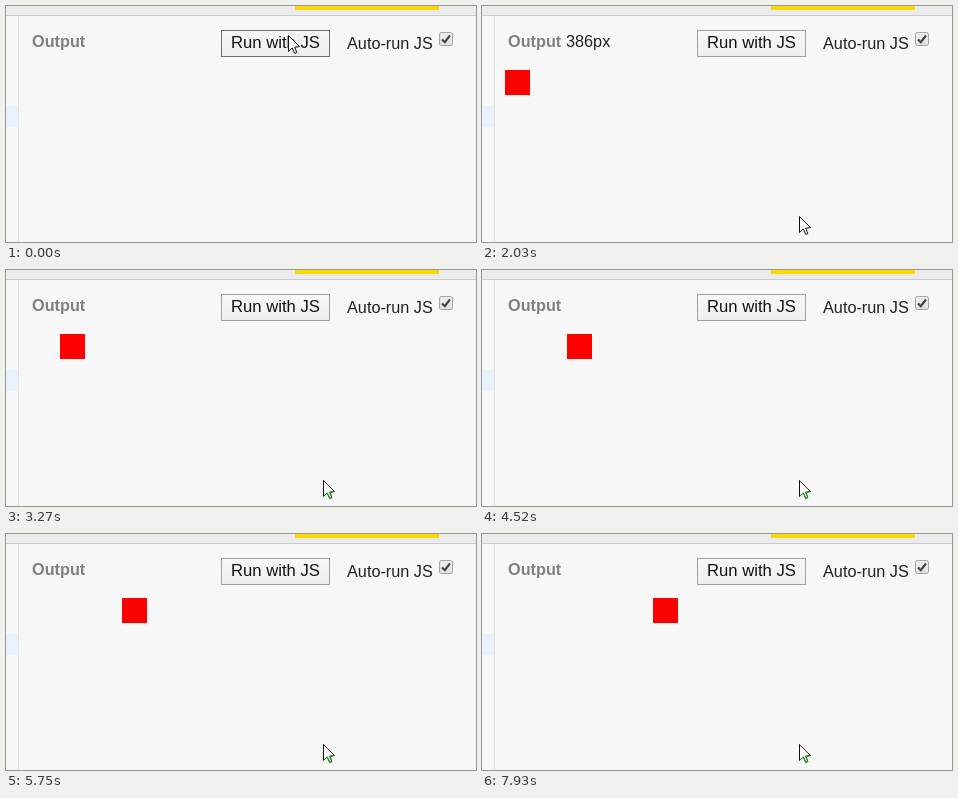
These frames come from a looping animation (470 px wide and 236 px high, 8 s). An HTML page with a canvas:

```html
<!DOCTYPE html>
<html lang="en">
<head>
<meta charset="utf-8">
<title>Output panel</title>
<style>
  html, body { margin: 0; width: 100%; height: 100%; overflow: hidden; background: #f7f7f7; }
  canvas { display: block; }
</style>
</head>
<body>
<canvas id="stage" width="470" height="236"></canvas>
<script>
const ctx = document.getElementById('stage').getContext('2d');
const LOOP = 8000;
const STEP = 77.63;
const FONT = '"Liberation Sans", Arial, sans-serif';

// Pointer positions as [time, x, y]; each one holds until the next.
const pointerStops = [
  [0, 282, 29], [70, 272, 8], [100, 264, -6],
  [250, 262, 2], [330, 259, 14], [400, 256, 25], [480, 254, 30],
  [650, 256, 34]
];

function pointerAt(t) {
  if (t >= 1110) {
    const p = Math.min(1, (Math.floor((t - 1110) / STEP) + 1) / 8);
    const eased = p * p * (3 - 2 * p);
    return { x: Math.round(256 + 61 * eased), y: Math.round(34 + 176 * eased) };
  }
  const [, x, y] = pointerStops.filter(stop => stop[0] <= t).pop();
  return { x, y };
}

function rect(x, y, w, h, color) {
  ctx.fillStyle = color;
  ctx.fillRect(x, y, w, h);
}

function text(str, x, y, size, color, weight = 'normal') {
  ctx.font = `${weight} ${size}px ${FONT}`;
  ctx.fillStyle = color;
  ctx.fillText(str, x, y);
}

function shade(y0, y1, top, bottom) {
  const g = ctx.createLinearGradient(0, y0, 0, y1);
  g.addColorStop(0, top);
  g.addColorStop(1, bottom);
  return g;
}

function polyline(points, close) {
  ctx.beginPath();
  points.forEach(([x, y]) => ctx.lineTo(x, y));
  if (close) ctx.closePath();
}

function drawPage() {
  rect(0, 0, 470, 236, '#f7f7f7');
  rect(0, 0, 470, 9, '#ebebeb');
  rect(0, 9, 470, 1, '#cccccc');
  rect(289, 0, 144, 4, '#ffd700');
  rect(12, 10, 1, 226, '#e4e4e4');
  rect(0, 100, 12, 21, '#e8f2ff');
  text('Output', 26, 41, 16.25, '#808080', 'bold');
  text('Auto-run JS', 341, 43, 16.25, '#222222');
}

function drawButton(hover, pressed) {
  const fill = pressed ? shade(24, 51, '#dedede', '#e9e9e9')
    : hover ? shade(24, 51, '#f6f6f6', '#eeeeee')
    : shade(24, 51, '#f8f8f8', '#efefef');
  rect(215, 24, 109, 27, hover ? '#707070' : '#a0a0a0');
  rect(216, 25, 107, 25, fill);
  text('Run with JS', 225, 42, 16.67, '#111111');
}

function drawCheckbox() {
  ctx.beginPath();
  ctx.roundRect(433.5, 26.5, 13, 13, 2);
  ctx.fillStyle = shade(26, 40, '#f0f0f0', '#dedede');
  ctx.fill();
  ctx.lineWidth = 1;
  ctx.strokeStyle = '#a4a4a4';
  ctx.stroke();
  polyline([[436, 33.5], [438.8, 36.2], [444, 29.5]]);
  ctx.lineWidth = 2.2;
  ctx.strokeStyle = '#444444';
  ctx.stroke();
}

function drawPointer({ x, y }, tinted) {
  const tip = [0.5, 0.5], heel = [0.5, 16.5], notch = [4.2, 13];
  const tail = [[6.8, 18.5], [8.8, 17.6], [6.7, 12.2]], wing = [11.6, 11.6];
  ctx.save();
  ctx.translate(x, y);
  ctx.lineWidth = 1;
  polyline([tip, heel, notch, ...tail, wing], true);
  ctx.fillStyle = '#ffffff';
  ctx.fill();
  ctx.strokeStyle = '#111111';
  ctx.stroke();
  if (tinted) {
    polyline([tip, wing]);
    ctx.strokeStyle = '#651515';
    ctx.stroke();
    polyline([heel, notch, ...tail, wing]);
    ctx.strokeStyle = '#16a016';
    ctx.stroke();
  }
  ctx.restore();
}

function draw(t) {
  const pointer = pointerAt(t);
  const hover = pointer.x >= 215 && pointer.x < 324 && pointer.y >= 24 && pointer.y < 51;
  drawPage();
  drawButton(hover, t >= 800 && t < 880);
  drawCheckbox();
  if (t >= 1110) {
    const steps = Math.max(0, Math.floor((t - 2020) / STEP));
    rect(Math.round(23 + 1.947 * steps), 64, 25, 25, '#ff0000');
    ctx.globalAlpha = Math.max(0, Math.min(1, (3240 - t) / 180));
    text('386px', 84, 41, 16.25, '#222222');
    ctx.globalAlpha = 1;
  }
  drawPointer(pointer, t >= 2890);
}

const start = performance.now();
function tick() {
  draw((performance.now() - start) % LOOP);
  requestAnimationFrame(tick);
}
tick();
</script>
</body>
</html>
```
